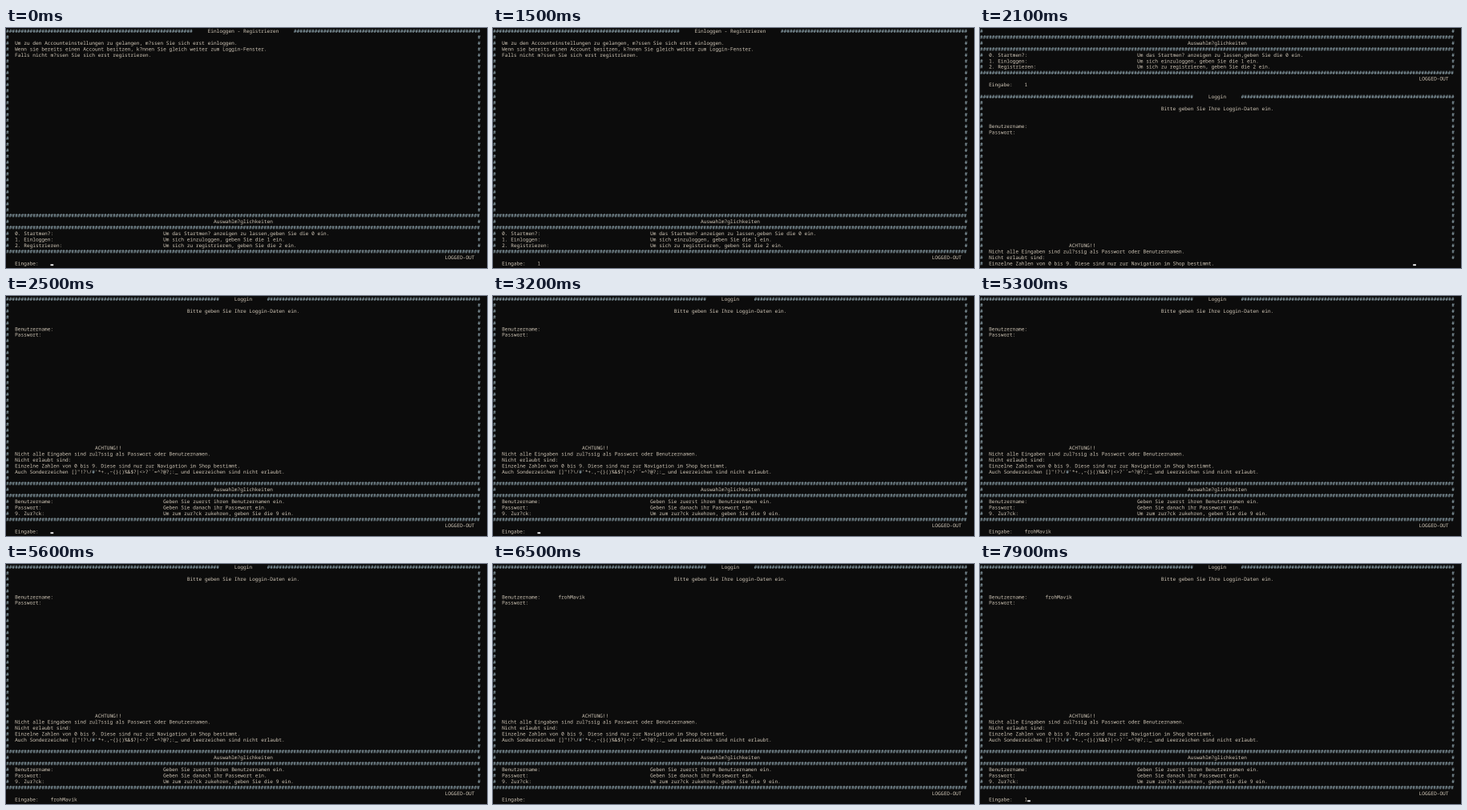
An HTML page with a canvas for the animation above (8 s loop, 600x300 px).

```html
<!DOCTYPE html>
<html lang="de">
<head>
<meta charset="utf-8">
<title>Konsole</title>
<style>
  html, body { margin: 0; width: 100%; height: 100%; overflow: hidden; background: #0c0c0c; }
  canvas { display: block; width: 600px; height: 300px; }
</style>
</head>
<body>
<canvas id="screen" width="1200" height="600"></canvas>
<script>
const LOOP = 8000, FRAME = 100, BLINK = 530, KEY_GAP = 150;
const COLS = 160, ROWS = 40, CELL_W = 3.7, CELL_H = 7.44, BASELINE = 6.1;
const USER = 'frohMavik';

const ctx = document.getElementById('screen').getContext('2d');

// --- Page layout -------------------------------------------------------
const put = (line, col, text) => line.slice(0, col) + text + line.slice(col + text.length);
const rule = '#'.repeat(COLS);
const empty = '#' + ' '.repeat(COLS - 2) + '#';
const centred = (line, text) => put(line, Math.floor((COLS - text.length) / 2), text);

function makePage(title, body, options) {
  const lines = Array(31).fill(empty);
  lines[0] = centred(rule, `     ${title}     `);
  for (const [row, col, text] of body) lines[row] = put(lines[row], col, text);
  lines.push(rule, centred(empty, 'Auswahlm?glichkeiten'), rule);
  for (const [name, hint] of options) lines.push(put(put(empty, 3, name), 53, hint));
  lines.push(rule, put(' '.repeat(COLS), 148, 'LOGGED-OUT'), '   Eingabe:    ');
  return lines.join('\n');
}

const menuPage = makePage('Einloggen - Registrieren', [
  [2, 3, 'Um zu den Accounteinstellungen zu gelangen, m?ssen Sie sich erst einloggen.'],
  [3, 3, 'Wenn sie bereits einen Account besitzen, k?nnen Sie gleich weiter zum Loggin-Fenster.'],
  [4, 3, 'Falls nicht m?ssen Sie sich erst registrieren.']
], [
  ['0. Startmen?:', 'Um das Startmen? anzeigen zu lassen,geben Sie die 0 ein.'],
  ['1. Einloggen:', 'Um sich einzuloggen, geben Sie die 1 ein.'],
  ['2. Registrieren:', 'Um sich zu registrieren, geben Sie die 2 ein.']
]);

const loginPage = user => makePage('Loggin', [
  [2, 61, 'Bitte geben Sie Ihre Loggin-Daten ein.'],
  [5, 3, 'Benutzername:      ' + user],
  [6, 3, 'Passwort:'],
  [25, 30, 'ACHTUNG!!'],
  [26, 3, 'Nicht alle Eingaben sind zul?ssig als Passwort oder Benutzernamen.'],
  [27, 3, 'Nicht erlaubt sind:'],
  [28, 3, 'Einzelne Zahlen von 0 bis 9. Diese sind nur zur Navigation im Shop bestimmt.'],
  [29, 3, 'Auch Sonderzeichen []"!?\\/#\'*+.,~{}()%&$?|<>?`´=^?@?;:_ und Leerzeichen sind nicht erlaubt.']
], [
  ['Benutzername:', 'Geben Sie zuerst ihren Benutzernamen ein.'],
  ['Passwort:', 'Geben Sie danach ihr Passewort ein.'],
  ['9. Zur?ck:', 'Um zum zur?ck zukehren, geben Sie die 9 ein.']
]);

// --- Timeline ----------------------------------------------------------
const steps = [
  { start: -200, page: menuPage, keysAt: 800, keys: '1' },
  { start: 2100, page: loginPage(''), keysAt: 3400, keys: USER },
  { start: 5900, page: loginPage(USER), keysAt: 7800, keys: '1' }
];
const HALF_PRINTED = 28 * (COLS + 1) + 146;

function consoleAt(time) {
  let lastChange = 0;
  const output = steps.filter(step => step.start <= time).map(({ start, page, keysAt, keys }) => {
    lastChange = start;
    if (time - start < FRAME) return page.slice(0, HALF_PRINTED);
    const typed = Math.min(keys.length, Math.max(0, Math.floor((time - keysAt) / KEY_GAP) + 1));
    if (typed) lastChange = keysAt + (typed - 1) * KEY_GAP;
    return page + keys.slice(0, typed);
  });
  return {
    lines: output.join('\n\n').split('\n').slice(-ROWS),
    cursorOn: (time - lastChange) % (2 * BLINK) < BLINK
  };
}

// --- Drawing -----------------------------------------------------------
function draw(time) {
  const { lines, cursorOn } = consoleAt(time);
  ctx.setTransform(2, 0, 0, 2, 0, 0);
  ctx.fillStyle = '#0c0c0c';
  ctx.fillRect(0, 0, 600, 300);
  ctx.font = `${CELL_W / 0.6}px "Noto Sans Mono", "DejaVu Sans Mono", monospace`;
  ctx.textRendering = 'geometricPrecision';
  lines.forEach((line, row) => {
    for (const run of line.matchAll(/#+|[^#\s]+/g)) {
      ctx.fillStyle = run[0][0] === '#' ? '#a9c3ce' : '#d6ccbc';
      ctx.fillText(run[0], run.index * CELL_W, row * CELL_H + BASELINE);
    }
  });
  if (cursorOn) {
    const row = lines.length - 1;
    ctx.fillStyle = '#f2f2f2';
    ctx.fillRect(lines[row].length * CELL_W, row * CELL_H + 5.1, CELL_W, 1.9);
  }
}

function tick() {
  const time = performance.now() % LOOP;
  draw(Math.floor(time / FRAME) * FRAME);
  requestAnimationFrame(tick);
}
tick();
</script>
</body>
</html>
```
